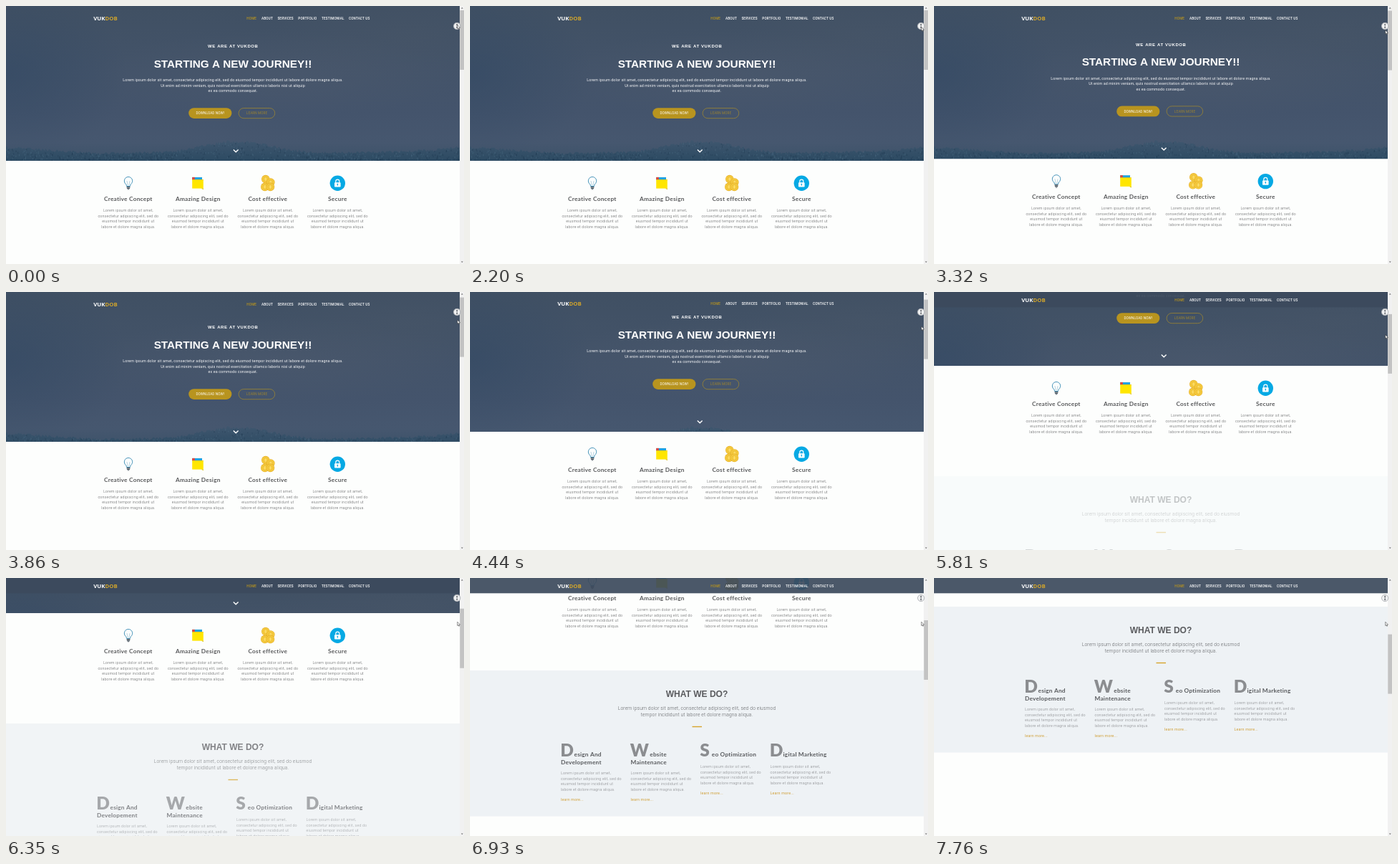
Write an HTML page with a canvas that moves like this. It is 640x360 px and loops after 8 s.

```html
<!DOCTYPE html>
<html lang="en">
<head>
<meta charset="utf-8">
<title>Landing page scroll</title>
<style>
html, body { margin: 0; width: 100%; height: 100%; overflow: hidden; background: #fdfefd; }
canvas { display: block; width: 640px; height: 360px; }
</style>
</head>
<body>
<canvas id="stage"></canvas>
<script>
const W = 640, H = 360, LOOP = 8000, PAGE_W = 634;
const HERO_END = 216, PANEL_TOP = 370, PANEL_END = 573.5;
const GOLD = '#b8941f', WHITE = '#fdfefd';
const ROBOTO = 'Roboto, sans-serif';
const LATO = 'Lato, sans-serif';
const OPEN = '"Open Sans", sans-serif';
const ARIAL = '"Liberation Sans", Arial, sans-serif';
const scale = Math.max(1, window.devicePixelRatio || 1);

function makeCanvas(el) {
  el.width = W * scale;
  el.height = H * scale;
  const c = el.getContext('2d');
  c.scale(scale, scale);
  return c;
}
const ctx = makeCanvas(document.getElementById('stage'));

// The page is repainted in steps: [time, scroll offset]
const STEPS = [
  [0, 0], [2200, 0], [2490, 0], [2780, 1], [3030, 2], [3320, 2.7], [3610, 4], [3860, 7],
  [4150, 13], [4440, 21], [4690, 33], [4980, 48], [5270, 69], [5520, 89], [5810, 113],
  [6100, 140], [6350, 167], [6640, 205], [6930, 241], [7180, 272], [7470, 297], [7760, 330]
];
const CURSOR_Y = [[0, 26.5], [2199, 26.5], [2200, 29.5], [2490, 33.5], [3320, 33.7], [3860, 39], [4440, 48], [5270, 58], [6350, 61.3]];
const NAV_Y = [[4150, 17.2], [4440, 16.2], [4690, 14], [4980, 10.8]];
const BAR_ALPHA = [[4440, 0], [4690, 0.2], [4980, 0.6], [5270, 0.8], [5810, 0.92]];
const FADE = [[5270, 0], [5520, 0.12], [6350, 0.74], [6930, 1]];
const RIDGE = [[0, 197], [60, 201], [130, 206], [230, 204], [275, 195], [310, 189], [345, 190], [385, 199], [430, 205], [520, 204], [600, 201], [635, 197]];

function tween(keys, x) {
  if (x <= keys[0][0]) return keys[0][1];
  for (let i = 1; i < keys.length; i++) {
    const [x0, y0] = keys[i - 1], [x1, y1] = keys[i];
    if (x <= x1) return y0 + (y1 - y0) * (x - x0) / (x1 - x0);
  }
  return keys[keys.length - 1][1];
}

function seeded(seed) {
  return () => (seed = (seed * 16807) % 2147483647) / 2147483647;
}

function text(str, x, y, font, color, align = 'left', spacing = 0) {
  ctx.font = font;
  ctx.letterSpacing = spacing + 'px';
  ctx.textAlign = align;
  ctx.fillStyle = color;
  ctx.fillText(str, x, y);
  return ctx.measureText(str).width;
}

function lines(list, x, y, pitch, size, color, align, weight = 300, spacing = 0.167) {
  list.forEach((s, i) => text(s, x, y + i * pitch, `${weight} ${size}px ${ROBOTO}`, color, align, spacing));
}

function box(x, y, w, h, color) {
  ctx.fillStyle = color;
  ctx.fillRect(x, y, w, h);
}

function disc(x, y, r, color, c = ctx) {
  c.fillStyle = color;
  c.beginPath();
  c.arc(x, y, r, 0, 7);
  c.fill();
}

function poly(points, color) {
  ctx.fillStyle = color;
  ctx.beginPath();
  points.forEach(([x, y]) => ctx.lineTo(x, y));
  ctx.closePath();
  ctx.fill();
}

function stroke(color, width) {
  ctx.strokeStyle = color;
  ctx.lineWidth = width;
  ctx.stroke();
}

function pill(x, y, w, h) {
  ctx.beginPath();
  ctx.roundRect(x, y, w, h, h / 2);
}

// Fixed sky and tree line behind the hero
function paintSky() {
  const el = document.createElement('canvas'), c = makeCanvas(el), rnd = seeded(41);
  const sky = c.createLinearGradient(0, 0, 0, HERO_END);
  [[0, '#405063'], [0.4, '#435369'], [0.7, '#44546c'], [0.88, '#46576f'], [1, '#3c5269']]
    .forEach(([p, col]) => sky.addColorStop(p, col));
  c.fillStyle = sky;
  c.fillRect(0, 0, W, HERO_END);
  const glow = (x, y, rx, ry, rgb, a) => {
    c.save();
    c.translate(x, y);
    c.scale(rx, ry);
    const g = c.createRadialGradient(0, 0, 0, 0, 0, 1);
    g.addColorStop(0, `rgba(${rgb},${a})`);
    g.addColorStop(1, `rgba(${rgb},0)`);
    disc(0, 0, 1, g, c);
    c.restore();
  };
  glow(0, 95, 170, 120, '46,70,98', 0.5);
  glow(380, 95, 260, 60, '84,95,112', 0.3);
  glow(560, 40, 200, 70, '76,88,104', 0.3);
  const trees = c.createLinearGradient(0, 189, 0, HERO_END);
  trees.addColorStop(0, '#3e566e');
  trees.addColorStop(1, '#2c4a62');
  c.fillStyle = trees;
  c.beginPath();
  c.moveTo(0, HERO_END);
  for (let x = 0; x <= W; x += 1.5) c.lineTo(x, tween(RIDGE, x) + rnd() * 4 - 2);
  c.lineTo(W, HERO_END);
  c.fill();
  for (let i = 0; i < 700; i++) {
    const x = rnd() * W, top = tween(RIDGE, x);
    c.fillStyle = rnd() < 0.5 ? 'rgba(84,118,140,.3)' : 'rgba(30,56,78,.35)';
    c.fillRect(x, top + rnd() * (HERO_END - top), 0.8 + rnd(), 1 + rnd() * 2);
  }
  return el;
}
const sky = paintSky();

function drawHero(scroll) {
  const end = HERO_END - scroll;
  if (end <= 0) return;
  ctx.save();
  ctx.beginPath();
  ctx.rect(0, 0, PAGE_W, end);
  ctx.clip();
  ctx.drawImage(sky, 0, 0, W, H);
  ctx.translate(0, -scroll);
  text('WE ARE AT VUKDOB', 317.3, 58.3, `700 6px ${ARIAL}`, '#fff', 'center', 0.6);
  text('STARTING A NEW JOURNEY!!', 317, 86.1, `700 15.3px ${ARIAL}`, '#fff', 'center');
  lines([
    'Lorem ipsum dolor sit amet, consectetur adipiscing elit, sed do eiusmod tempor incididunt ut labore et dolore magna aliqua.',
    'Ut enim ad minim veniam, quis nostrud exercitation ullamco laboris nisi ut aliquip',
    'ex ea commodo consequat.'
  ], 317, 105.4, 7.5, 5.33, '#f4f5f7', 'center', 400, 0.125);
  pill(255.2, 142.2, 60.2, 14.8);
  ctx.fillStyle = GOLD;
  ctx.fill();
  text('DOWNLOAD NOW!', 285.2, 151.3, `400 4.67px ${ROBOTO}`, '#fff', 'center', 0.1);
  pill(325.1, 142.5, 50.6, 14.2);
  stroke('#a68b2b', 0.7);
  text('LEARN MORE', 350.5, 151.3, `400 4.67px ${ROBOTO}`, '#9b8330', 'center', 0.1);
  ctx.beginPath();
  ctx.moveTo(317.8, 200.5);
  ctx.lineTo(321.2, 203.8);
  ctx.lineTo(324.6, 200.5);
  stroke('#fff', 1.4);
  ctx.restore();
}

function drawBulb() {
  ctx.beginPath();
  ctx.arc(171, 244.1, 5.7, 2.2, 0.94);
  ctx.lineTo(173.2, 251.6);
  ctx.lineTo(168.8, 251.6);
  ctx.closePath();
  stroke('#3589b3', 0.9);
  ctx.beginPath();
  ctx.moveTo(169, 244);
  ctx.lineTo(170.3, 251.5);
  ctx.moveTo(173, 244);
  ctx.lineTo(171.7, 251.5);
  stroke('#8bb9cf', 0.6);
  box(168.6, 252, 4.8, 1.3, '#33414d');
  box(168.9, 253.8, 4.2, 1.1, '#33414d');
  box(169.8, 255.4, 2.4, 0.8, '#33414d');
}

function drawCalendar() {
  box(260.2, 238.9, 13.8, 4.2, '#22a3e0');
  box(260.2, 238.9, 3.6, 3.2, '#e2483d');
  box(260.2, 242.2, 15.6, 12.4, '#ffe600');
  box(260.2, 242.2, 15.6, 0.5, '#eab800');
  poly([[273, 254.6], [275.8, 254.6], [275.8, 256.3]], '#d9bd00');
}

function drawCoins() {
  disc(366, 248, 5, '#e3ac28');
  [[362.8, 241.6], [369.8, 246], [361.8, 252.4], [369.4, 252.4]].forEach(([x, y]) => {
    disc(x, y, 5.8, '#e3ac28');
    disc(x, y, 5.2, '#f8cf42');
    ctx.beginPath();
    ctx.arc(x, y, 3.4, 0, 7);
    stroke('#e6b431', 0.7);
    box(x - 0.5, y - 2, 1, 4, '#fbe38a');
  });
}

function drawLock() {
  disc(463.3, 247.3, 10.7, '#06a9e4');
  ctx.beginPath();
  ctx.arc(463.3, 244.6, 2.5, Math.PI, 0);
  ctx.lineTo(465.8, 247);
  ctx.moveTo(460.8, 244.6);
  ctx.lineTo(460.8, 247);
  stroke('#fff', 1.2);
  ctx.beginPath();
  ctx.roundRect(459, 246.2, 8.6, 6.3, 0.8);
  ctx.fillStyle = '#fff';
  ctx.fill();
  disc(463.3, 248.7, 0.9, '#06a9e4');
  box(462.9, 248.9, 0.8, 2, '#06a9e4');
}

const BLURB = ['Lorem ipsum dolor sit amet,', 'consectetur adipiscing elit, sed do', 'eiusmod tempor incididunt ut', 'labore et dolore magna aliqua.'];

function drawFeatures() {
  drawBulb();
  drawCalendar();
  drawCoins();
  drawLock();
  [['Creative Concept', 170.8], ['Amazing Design', 268.3], ['Cost effective', 365.8], ['Secure', 463.3]].forEach(([name, x]) => {
    text(name, x, 271.7, `700 8.3px ${LATO}`, '#58595b', 'center', 0.24);
    lines(BLURB, x, 287, 7.5, 5.33, '#5a5b5d', 'center');
  });
}

// x, initial, x of the rest, rest, second line, link
const SERVICES = [
  [127, 'D', 145.5, 'esign And', 'Developement', 'learn more...'],
  [224.5, 'W', 251.3, 'ebsite', 'Maintenance', 'learn more...'],
  [322, 'S', 337.8, 'eo Optimization', '', 'learn more...'],
  [419.5, 'D', 437.5, 'igital Marketing', '', 'Learn more...']
];

function drawServices(alpha) {
  if (!alpha) return;
  ctx.globalAlpha = alpha;
  box(0, PANEL_TOP, PAGE_W, PANEL_END - PANEL_TOP, '#eef2f5');
  text('WHAT WE DO?', 317, 406.8, `700 12px ${ARIAL}`, '#5a5b5e', 'center');
  lines(['Lorem ipsum dolor sit amet, consectetur adipiscing elit, sed do eiusmod', 'tempor incididunt ut labore et dolore magna aliqua.'],
    317, 424.9, 9.4, 6.67, '#5c5e61', 'center');
  box(310.5, 447.8, 13.5, 1.4, '#d6a42c');
  const title = `700 8.3px ${LATO}`;
  SERVICES.forEach(([x, cap, restX, rest, second, link]) => {
    const y = second ? 515 : 506.2;
    text(cap, x - 0.8, 490.3, `900 24.5px ${LATO}`, '#8b8d90');
    text(rest, restX, 490.3, title, '#595b5e', 'left', 0.2);
    text(second, x, 501.2, title, '#595b5e', 'left', 0.2);
    lines(BLURB, x, y, 7.5, 5.33, '#7f8184', 'left');
    text(link, x, y + 36.6, `400 5.33px ${ROBOTO}`, '#d0a13a', 'left', 0.167);
  });
  ctx.globalAlpha = 1;
}

function drawNav(y, alpha) {
  if (alpha) box(0, 0, PAGE_W, 21.3, `rgba(60,74,93,${alpha})`);
  const logo = `700 7.8px ${OPEN}`;
  const w = text('VUK', 122.3, y + 2.8, logo, '#fff');
  text('DOB', 122.3 + w, y + 2.8, logo, '#d2a52b');
  [['HOME', 336.3], ['ABOUT', 357], ['SERVICES', 379.4], ['PORTFOLIO', 408.3], ['TESTIMONIAL', 441], ['CONTACT US', 479]]
    .forEach(([s, x], i) => text(s, x, y + 1.8, `500 4.67px ${ROBOTO}`, i ? '#fff' : GOLD, 'left', 0.15));
}

function drawScrollbar(scroll) {
  box(PAGE_W, 0, W - PAGE_W, H, '#f1f1f1');
  box(PAGE_W + 0.3, 6 + scroll * 0.22, W - PAGE_W, 83, '#c3c3c3');
  poly([[635.9, 3.6], [638.7, 3.6], [637.3, 1.9]], '#5a5a5a');
  poly([[635.9, 356.4], [638.7, 356.4], [637.3, 358.1]], '#5a5a5a');
}

function drawPointer(y) {
  const x = 630.2, cy = 28;
  disc(x, cy, 5, '#f4f5f6');
  ctx.beginPath();
  ctx.arc(x, cy, 4.6, 0, 7);
  stroke('#85898f', 0.6);
  poly([[x - 1.6, cy - 1.6], [x + 1.6, cy - 1.6], [x, cy - 3.4]], '#4b4f55');
  poly([[x - 1.6, cy + 1.6], [x + 1.6, cy + 1.6], [x, cy + 3.4]], '#4b4f55');
  disc(x, cy, 0.7, '#4b4f55');
  const tip = 630.8;
  poly([[0, 0], [0, 5.2], [1.2, 4.2], [2, 6], [2.8, 5.6], [2.1, 3.9], [3.7, 3.8]].map(([dx, dy]) => [tip + dx, y + dy]), '#fff');
  stroke('#222', 0.5);
}

function draw(now) {
  const t = now % LOOP;
  const [at, scroll] = STEPS.filter(s => s[0] <= t).pop();
  box(0, 0, W, H, WHITE);
  drawHero(scroll);
  ctx.save();
  ctx.translate(0, -scroll);
  drawFeatures();
  drawServices(tween(FADE, at));
  ctx.restore();
  drawNav(tween(NAV_Y, at), tween(BAR_ALPHA, at));
  drawScrollbar(scroll);
  drawPointer(tween(CURSOR_Y, at));
}

const start = performance.now();
function tick() {
  draw(performance.now() - start);
  requestAnimationFrame(tick);
}
tick();
</script>
</body>
</html>
```
